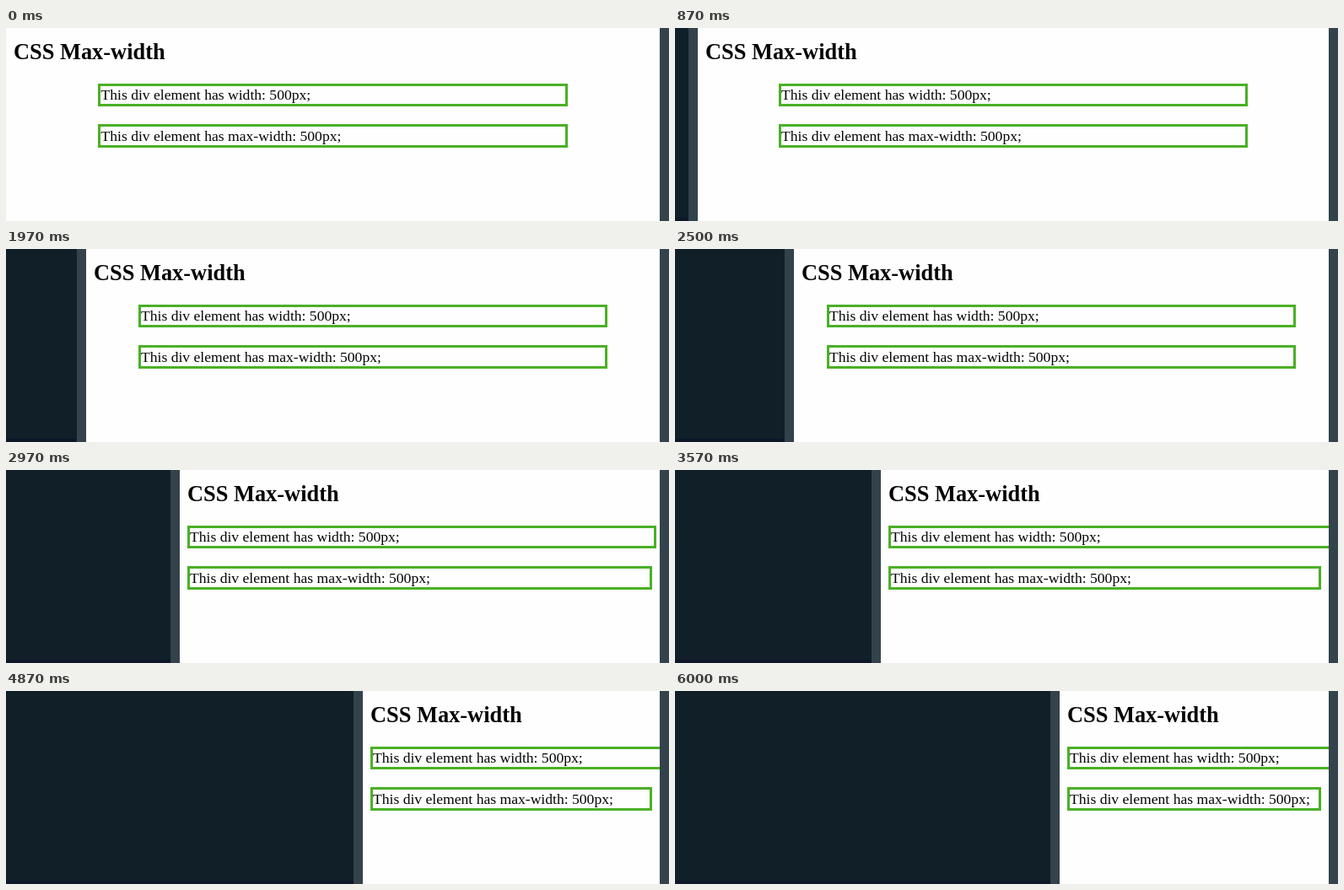
These frames come from a looping animation (786x229 px, 8010 ms). An HTML page:

```html
<!DOCTYPE html>
<html lang="en">
<head>
<meta charset="utf-8">
<title>CSS Max-width</title>
<style>
  html, body { margin: 0; width: 100%; height: 100%; overflow: hidden; background: #fefefe; }
  svg { display: block; width: 786px; height: 229px; }
  text { font-family: "Liberation Serif", "Times New Roman", serif; font-size: 17.6px; fill: #050505; }
  #heading { font-size: 26.4px; font-weight: bold; }
  .frame { fill: none; stroke: #4ab025; stroke-width: 3; }
  .bar { fill: #34434b; }
</style>
</head>
<body>
<svg viewBox="0 0 786 229">
  <rect width="786" height="229" fill="#fefefe"/>
  <text id="heading" y="37">CSS Max-width</text>
  <rect id="fixedBox" class="frame" y="67.5" height="24"/>
  <text id="fixedText" y="85">This div element has width: 500px;</text>
  <rect id="fluidBox" class="frame" y="115.5" height="25"/>
  <text id="fluidText" y="134">This div element has max-width: 500px;</text>
  <g id="side">
    <rect x="-786" width="786" height="229" fill="#111f29"/>
    <rect x="-786" y="225" width="786" height="4" fill="#0d1728"/>
    <rect class="bar" x="-11" width="11" height="229"/>
  </g>
  <rect class="bar" x="775" width="11" height="229"/>
</svg>
<script>
const LOOP = 8010, FRAME = 100 / 3;
const PANE_RIGHT = 775, MARGIN = 9, BOX_WIDTH = 556;

// [time in ms, left edge of the page pane] along the drag
const DRAG = [
  [0, 0], [767, 0], [800, 14], [833, 22], [867, 27], [1033, 27], [1500, 39],
  [1867, 76], [1967, 95], [2700, 161], [2967, 206], [3533, 241], [4133, 326],
  [4367, 369], [4867, 423], [5200, 456], [LOOP, 456]
];

const secant = i => (DRAG[i + 1][1] - DRAG[i][1]) / (DRAG[i + 1][0] - DRAG[i][0]);

// Harmonic mean of neighbouring slopes keeps the curve monotone
const slopes = DRAG.map((_, i) => {
  if (i === 0 || i === DRAG.length - 1) return 0;
  const a = secant(i - 1), b = secant(i);
  return a * b > 0 ? 2 * a * b / (a + b) : 0;
});

function paneLeft(t) {
  let i = 0;
  while (i < DRAG.length - 2 && t >= DRAG[i + 1][0]) i++;
  const [t0, x0] = DRAG[i], [t1, x1] = DRAG[i + 1];
  const h = t1 - t0, u = (t - t0) / h, v = 1 - u;
  return v * v * (1 + 2 * u) * x0 + u * u * (3 - 2 * u) * x1
       + h * u * v * (v * slopes[i] - u * slopes[i + 1]);
}

const el = id => document.getElementById(id);
const [heading, fixedBox, fixedText, fluidBox, fluidText, side] =
  ["heading", "fixedBox", "fixedText", "fluidBox", "fluidText", "side"].map(el);

function placeBox(box, label, left, right) {
  const x0 = Math.floor(left), x1 = Math.ceil(right);
  box.setAttribute("x", x0 + 1.5);
  box.setAttribute("width", x1 - x0 - 3);
  label.setAttribute("x", left + 3);
}

function draw(time) {
  const step = Math.floor((time % LOOP + 4) / FRAME);
  const pane = Math.round(paneLeft(Math.min(step * FRAME + 0.5, LOOP)));
  const start = pane + MARGIN, end = PANE_RIGHT - MARGIN;
  const left = Math.max(start, (start + end - BOX_WIDTH) / 2);
  const right = left + BOX_WIDTH;

  side.setAttribute("transform", `translate(${pane} 0)`);
  heading.setAttribute("x", start);
  placeBox(fixedBox, fixedText, left, right);
  placeBox(fluidBox, fluidText, left, Math.min(right, end));
}

const origin = performance.now();
function tick() {
  draw(performance.now() - origin);
  requestAnimationFrame(tick);
}
tick();
</script>
</body>
</html>
```
